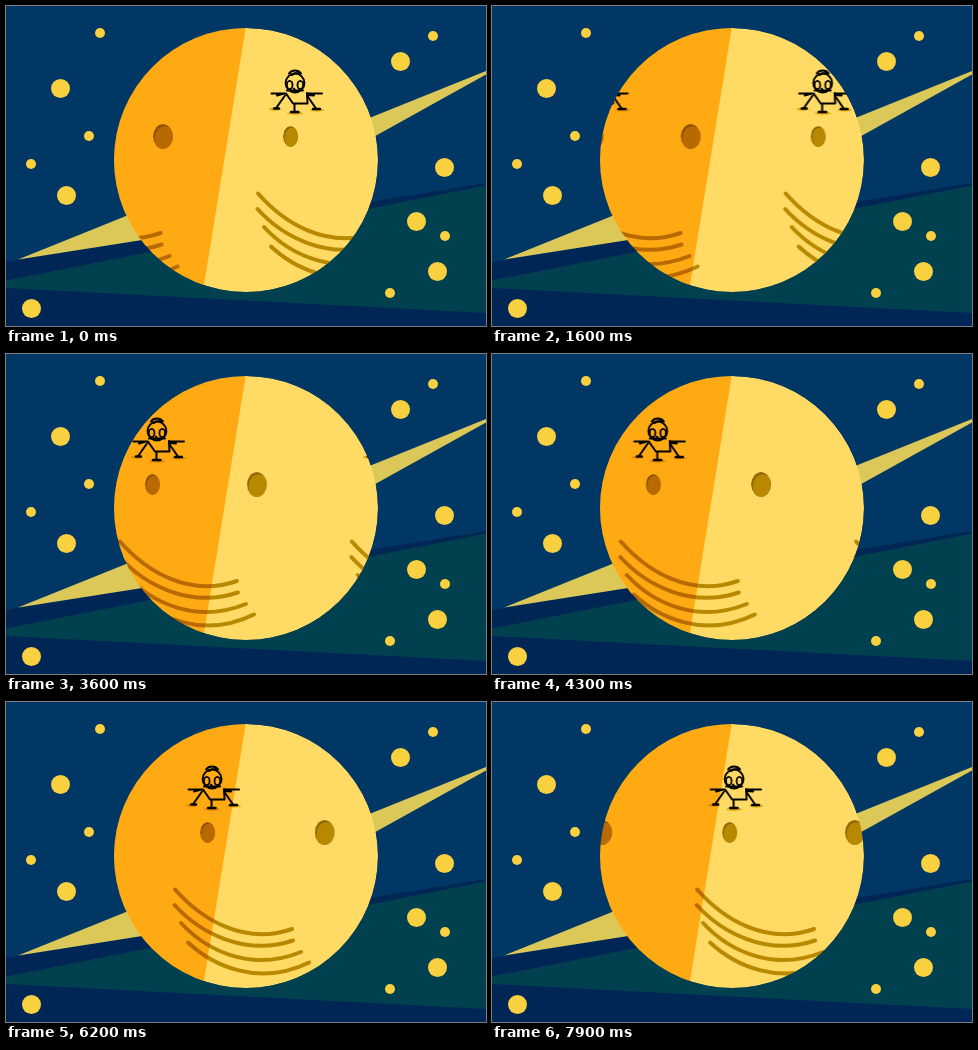
An HTML page without scripts that plays this animation: 480x320 px, repeating every 8000 ms.

```html
<!DOCTYPE html>
<html lang="en">
<head>
<meta charset="utf-8">
<title>Turning planet</title>
<style>
  html, body { margin: 0; width: 100%; height: 100%; overflow: hidden; background: #003764; }
  svg { display: block; width: 480px; height: 320px; }
  .half { mix-blend-mode: multiply; }
  .line { fill: none; stroke: #000; stroke-width: 2; stroke-linecap: round; stroke-linejoin: round; }
  .smile { fill: none; stroke: #b88900; stroke-width: 4; stroke-linecap: round; }
  /* the face drifts in ten steps a second; the 1ms offset keeps steps off the sample edge */
  .near, .far { animation: 8s steps(80, end) -1ms infinite; }
  .near { animation-name: near; }
  .far { animation-name: far; }
  @keyframes near { from { transform: translateX(104px); } to { transform: translateX(312.4px); } }
  @keyframes far { from { transform: translateX(-110.4px); } to { transform: translateX(59.2px); } }
</style>
</head>
<body>
<svg viewBox="0 0 480 320" xmlns="http://www.w3.org/2000/svg">
  <defs>
    <clipPath id="disc"><circle cx="240" cy="154" r="132"/></clipPath>
    <clipPath id="rim"><ellipse rx="10" ry="12.5"/></clipPath>

    <g id="crater" clip-path="url(#rim)">
      <ellipse rx="10" ry="12.5" fill="#8f6800"/>
      <ellipse cx="1.8" cy="2.2" rx="10" ry="12.5" fill="#b88900"/>
    </g>

    <!-- lander, centred on x = 0 -->
    <g id="lander">
      <g fill="#dfa400">
        <ellipse cx="-20" cy="103.3" rx="6" ry="1.5"/>
        <ellipse cx="22" cy="104" rx="7" ry="1.5"/>
        <ellipse cx="0" cy="107.2" rx="8" ry="1.5"/>
      </g>
      <g class="line">
        <path d="M-6 67.5Q-4 64.5 0 64.5T6 67.5Q0 65.8 -3 69"/>
        <circle cy="77" r="9.4"/>
        <ellipse cx="-5.3" cy="79" rx="2.8" ry="4.2" stroke-width="1.8"/>
        <ellipse cx="5.3" cy="79" rx="2.8" ry="4.2" stroke-width="1.8"/>
        <path d="M-8 84.5H8M-9 87.5L-2 97.5H12.500L12 87M-1 82.500L1 86"/>
        <path d="M-10 89.500L-18.500 101.500M12 89.500L21 102.500M-.5 98V106"/>
        <path stroke-width="2.4" d="M-21 102.5H-16M18 103H25M-4 106H3.500"/>
        <path d="M-23.500 87.500H-10M-18 89.500L-11 87.500M12 89L19 89.500M12 87.500H27"/>
      </g>
    </g>

    <g id="face">
      <use href="#crater" transform="translate(53 130.500)"/>
      <use href="#crater" transform="translate(180.500 130.500) scale(.75 .84)"/>
      <g class="smile">
        <path d="M148 187.500C174 217 217 244 265 227"/>
        <path d="M147.500 203C172 230 217 255 266 238.500"/>
        <path d="M154 221C178 247 222 271 274 250"/>
        <path d="M161 240.500C184 262 230 286 282 260.500"/>
      </g>
      <use href="#lander" x="185"/>
    </g>
  </defs>

  <rect width="480" height="320" fill="#003764"/>
  <path fill="#002656" d="M0 256L480 177V320H0Z"/>
  <path fill="#00404f" d="M0 274.500L480 179.500V307L0 282Z"/>
  <path fill="#dbc859" d="M12 253.500L480 65V68.500L200 224Z"/>

  <g fill="#f9d03f">
    <circle cx="94" cy="27" r="5"/>
    <circle cx="54.500" cy="82.500" r="9.500"/>
    <circle cx="83" cy="130" r="5"/>
    <circle cx="25" cy="158" r="5"/>
    <circle cx="60.500" cy="189.500" r="9.500"/>
    <circle cx="25.500" cy="302.500" r="9.500"/>
    <circle cx="427" cy="30" r="5"/>
    <circle cx="394.500" cy="55.500" r="9.500"/>
    <circle cx="438.500" cy="161.500" r="9.500"/>
    <circle cx="410.500" cy="215.500" r="9.500"/>
    <circle cx="439" cy="230" r="5"/>
    <circle cx="431.500" cy="265.500" r="9.500"/>
    <circle cx="384" cy="287" r="5"/>
  </g>

  <g clip-path="url(#disc)">
    <circle cx="240" cy="154" r="132" fill="#ffdb66"/>
    <g class="far"><use href="#face"/></g>
    <g class="near"><use href="#face"/></g>
    <path class="half" fill="#ffc62e" d="M240 20L196.500 288H100V20Z"/>
  </g>
</svg>
</body>
</html>
```
